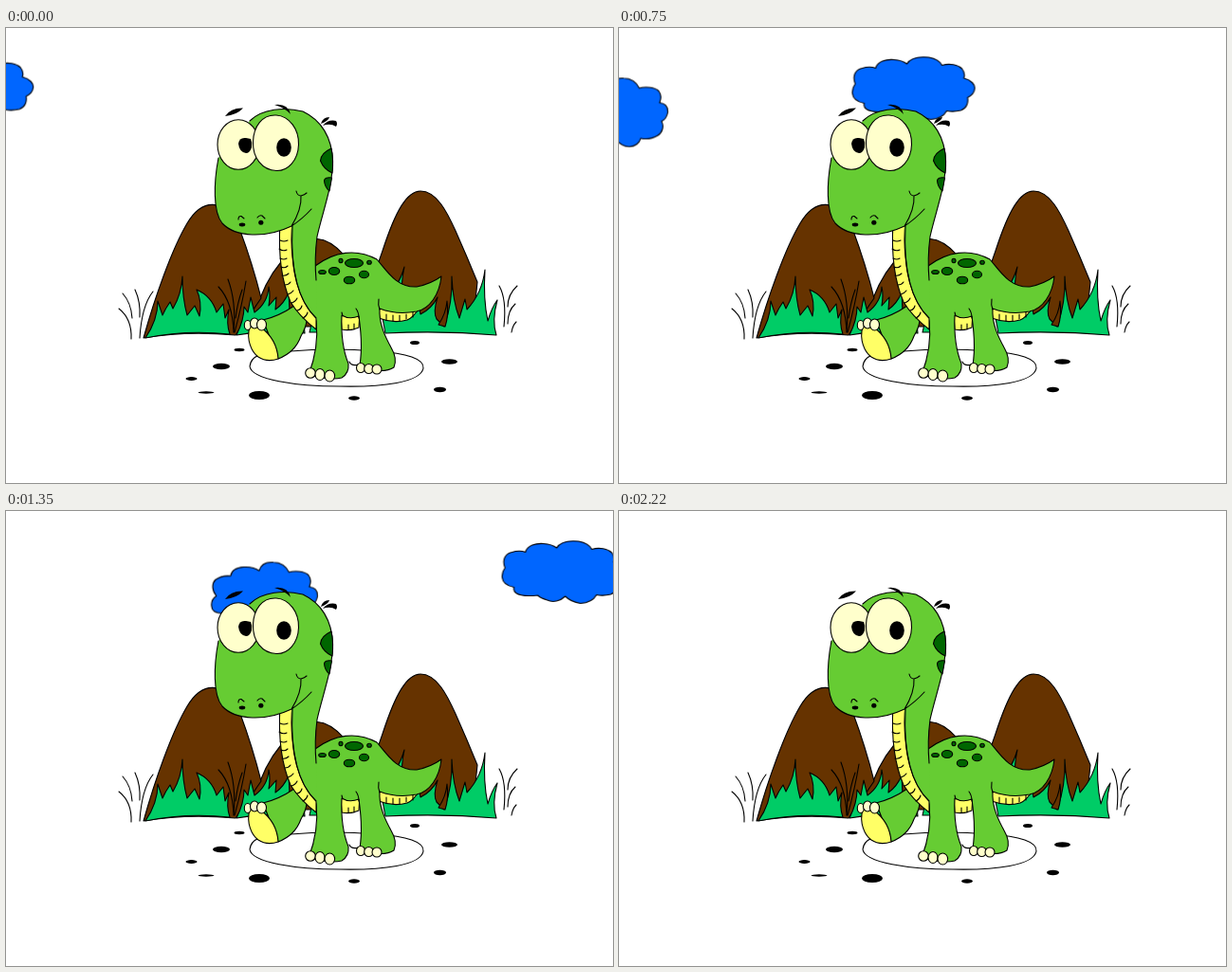
Recreate the animation shown at these times as an HTML page without scripts. Size 640 by 480 pixels, loop 2250 ms.

```html
<!DOCTYPE html>
<html lang="en">
<head>
<meta charset="utf-8">
<title>Little dinosaur</title>
<style>
html, body { margin: 0; width: 100%; height: 100%; overflow: hidden; background: #fff; }
svg { display: block; width: 640px; height: 480px; }
.ink { stroke: #000; stroke-width: 1.1; stroke-linejoin: round; stroke-linecap: round; }
.line { fill: none; }
.sky { fill: #06f; }
.skin { fill: #6c3; }
.spot { fill: #060; }
.belly { fill: #ff6; }
.cream { fill: #ffc; }
.hill { fill: #630; }
.grass { fill: #0c6; }
.cloud { animation: drift 2250ms steps(75) -1ms infinite; }
.far { --from: translate(-207.8px, -.4px); --to: translate(831.2px, 3.4px); }
.near { --from: translate(-512.5px, -2px); --to: translate(526.3px, 2.2px); animation-name: drift, vanish; }
@keyframes drift { from { transform: var(--from); } to { transform: var(--to); } }
@keyframes vanish { 0%, 98.5% { opacity: 1; } 98.6%, 100% { opacity: 0; } }
</style>
</head>
<body>
<svg viewBox="0 0 640 480">
  <g class="ink sky">
    <path class="cloud far" d="M110.500 58C107 49 111 43 118 41.500Q126 39 132 41.500C134 34 143 32 151 32.500Q160 33 165 37C169 30 178 29 188 30Q199 32 202 38.500C210 36 219 38 223 42Q227 47 225 52C233 54 237 59 236.500 63Q236 69 229 72.500C230 78 228 84 222 86Q214 88 207 86.500C204 92 198 95 190 95.500Q180 94 174 88C169 93 161 95 155 92Q148 90 145 87C136 88 127 88 122 84.500Q119 82 120 78.500C112 77 108 73 107.500 68Q107 63 110.500 58Z"/>
    <path class="cloud near" d="M111 89C106 83 106 76 110 72Q117 67 126 68C127 61 133 59 140 58.500Q150 58 156 62.500C158 55 164 53 171 53.500Q183 54 187.500 64C194 62 204 63 208 67Q212 72 209 79.500C215 80 218 84 217.500 90Q216 97 211 99C214 104 212 111 207 114Q199 119 189 117C188 122 183 125.500 177 126Q168 125 164 119C160 124 156 126.500 152 126Q145 125 140 118.500C132 120 123 119 119 115Q116 111 117 107.500C111 107 106 105 106 100Q105 93 111 89Z"/>
  </g>

  <!-- hills and grass -->
  <g class="ink">
    <g class="hill">
      <path d="M268 285Q279 256 300 236C319 217 337 218 356 239L370 315H250Z"/>
      <path d="M145 327C157 284 175 233 191 206C206 181 230 176 247 214Q260 249 269 285L242 324Q190 319 145 327Z"/>
      <path d="M388 260Q393 247 397 235C411 192 423 172 437 172C454 172 465 194 474 214Q486 241 497 268L492 316H410Z"/>
    </g>
    <g class="grass">
      <path d="M147 327Q160 308 160 288L165 303Q168 296 173 289L176 296Q185 281 186 262Q186 285 191 303L199 293L204 304Q207 289 201 276Q217 283 222 300L229 291L231 306L235 297Q232 312 236 323Q190 318 147 327Z"/>
      <path d="M243 324Q251 308 251 294L255 300L258 284L262 300Q276 290 277 273Q279 282 277 293L285 284L284 297Q293 291 298 279L299 299L312 289L315 322Q280 318 243 324Z"/>
      <path d="M320 321L323 308L330 314V321Z"/>
      <path d="M400 322L394 290Q413 277 420 252Q416 270 418 287L433 280L437 302Q449 296 455 284Q450 300 454 307L462 315Q471 290 470 262Q471 288 478 306L484 286L486 297Q502 280 505 255Q503 286 508 309Q512 295 518 287Q512 309 517 324Q460 319 400 322Z"/>
    </g>
    <path class="hill" d="M456 313Q464 301 465 288Q467 303 463 315Z"/>
    <path class="line" d="M119 296Q133 307 132 328M123 280Q132 290 133 306M136 276Q142 289 141 305M155 278Q143 293 141 327M224 273Q239 289 240 321M234 265Q243 289 240 321M253 267Q249 292 241 321M249 276Q244 290 242 306M520 272Q528 286 525 315M539 272Q529 281 529 294M537 291Q529 298 529 312M538 310Q534 314 533 321"/>
  </g>

  <path class="ink" fill="#fff" d="M257 357C258 346 272 340 300 341Q345 337 390 341C423 343 441 349 440 359C437 374 397 379 352 378C306 378 259 371 257 357Z"/>
  <g>
    <ellipse cx="246" cy="339.500" rx="5.500" ry="1.700"/>
    <ellipse cx="227" cy="357" rx="9" ry="3.300"/>
    <ellipse cx="195.500" cy="370" rx="6" ry="1.900"/>
    <ellipse cx="211" cy="384.500" rx="8.500" ry="1.200"/>
    <ellipse cx="267" cy="387.500" rx="11" ry="4.500"/>
    <ellipse cx="367" cy="390.500" rx="6" ry="2.200"/>
    <ellipse cx="431" cy="332" rx="5" ry="2"/>
    <ellipse cx="467.500" cy="352" rx="8.500" ry="2.800"/>
    <ellipse cx="457.500" cy="381.500" rx="6.500" ry="2.700"/>
  </g>

  <!-- body -->
  <g class="ink">
    <path class="skin" d="M304 293Q288 304 271 308L287 349Q305 342 311 325Q317 315 317 307Z"/>
    <path class="belly" d="M257 315C253 329 259 342 266 347Q275 353 287 349C286 333 277 322 269 316Z"/>
    <path class="belly" d="M353 302L373 300L372 316Q363 320 354 318ZM393 295L435 296Q430 305 423 308Q408 312 393 306Z"/>
    <path class="line" d="M361 313V318M367 312V318M401 302V308M408 303V309M415 303V309M422 302V307M429 300V305"/>
    <path class="skin" d="M326 251C346 236 369 232 391 244C402 257 412 274 433 273Q448 270 459 262C457 281 447 296 433 299Q412 303 394 296C393 312 400 326 406 337Q413 349 409 358Q402 363 387 361H372C376 343 374 318 372 304Q362 308 354 303C353 328 356 342 361 354Q362 364 354 369Q342 372 319 366C327 345 329 326 327 309Q312 293 305 270Z"/>
    <path class="line" d="M372 306Q372 300 369 296M355 304L354 300M394 297Q392 292 393 286M362 352Q364 357 372 355"/>
    <path class="belly" d="M289 205C287 237 290 266 300 289Q309 304 327 318V306C313 293 304 269 302 241Q300 223 302 204Z"/>
    <path class="line" d="M289 224Q293 226 297 224M288 233Q292 236 296 234M289 243Q293 245 296 243M290 252Q294 254 297 251M291 261Q295 262 298 259M294 271Q298 271 300 268M297 281Q301 280 303 277M301 290Q305 289 307 285M307 298Q311 297 312 293M313 306Q317 304 318 300"/>
  </g>

  <!-- head and neck -->
  <path class="skin" d="M257 98C270 85 294 83 313 88C332 97 344 115 344.500 141C344 169 334 193 328 220Q325 243 327 266L328 307C311 293 301 260 301 209C274 222 242 221 228 206C218 194 219 163 224 137Z"/>
  <g class="ink">
    <path class="line" d="M327 266Q325 243 328 220C334 193 344 169 344.500 141C344 115 332 97 313 88C294 83 270 85 257 98M224 137C219 163 218 194 228 206C242 221 274 222 301 209Q313 201 322 191M302 209C300 249 306 286 327 306M311 177Q312 191 301 209M306 172Q307 177 311 177Q315 176 317 174M245 202Q245 198 248 198.500L251 201M265 200Q267 197 270 198L273 201"/>
    <g class="spot">
      <path d="M343 127Q332 132 331.500 140Q335 149 344 153Q345.500 139 343 127ZM343.500 158Q336 157 335.500 161Q336 168 341 172Z"/>
      <ellipse cx="367" cy="248" rx="9.500" ry="4.500"/>
      <ellipse cx="353" cy="245.500" rx="2" ry="2.200"/>
      <ellipse cx="383" cy="247.300" rx="2.300" ry="2"/>
      <ellipse cx="346" cy="256.500" rx="5.700" ry="4"/>
      <ellipse cx="333.500" cy="257.500" rx="3.800" ry="2"/>
      <ellipse cx="377.500" cy="260" rx="5" ry="3.700"/>
      <ellipse cx="362" cy="266" rx="5.700" ry="3.800"/>
    </g>
    <g class="cream">
      <ellipse cx="245" cy="123" rx="22" ry="26.300"/>
      <path d="M285 92C299 93 309 107 308.500 123C308 140 297 151 285 150.500C270 150 260 137 260.500 120C261 104 270 91 285 92Z"/>
      <ellipse cx="254.800" cy="313.500" rx="3.500" ry="5"/>
      <ellipse cx="262" cy="311.500" rx="4.500" ry="5.500"/>
      <ellipse cx="269.500" cy="313" rx="5" ry="6"/>
      <ellipse cx="321" cy="364" rx="5.300" ry="5.300"/>
      <ellipse cx="331" cy="365.500" rx="5" ry="6"/>
      <ellipse cx="341.300" cy="367" rx="5.300" ry="6"/>
      <ellipse cx="374" cy="358.500" rx="4.500" ry="5"/>
      <ellipse cx="382.500" cy="359.500" rx="4.800" ry="5"/>
      <ellipse cx="391" cy="360" rx="5" ry="5"/>
    </g>
  </g>
  <path d="M245 122Q246 115 253 116L258 117Q260 121 259 126Q257 132 253 132Q246 131 245 122Z"/>
  <ellipse cx="293" cy="126" rx="7.800" ry="9.800"/>
  <ellipse cx="249" cy="207.500" rx="3.300" ry="1.900"/>
  <ellipse cx="268.800" cy="205.300" rx="2.600" ry="2.500"/>
  <path d="M231 93Q237 84 250 84.500Q243 92 231 93ZM283 81Q297 79 300 91Q294 84 283 81ZM332 101Q334 94 341 94Q340 98 332 101ZM334 103Q340 96 348 98Q350 101 348 104Q342 100 334 103Z"/>
</svg>
</body>
</html>
```
